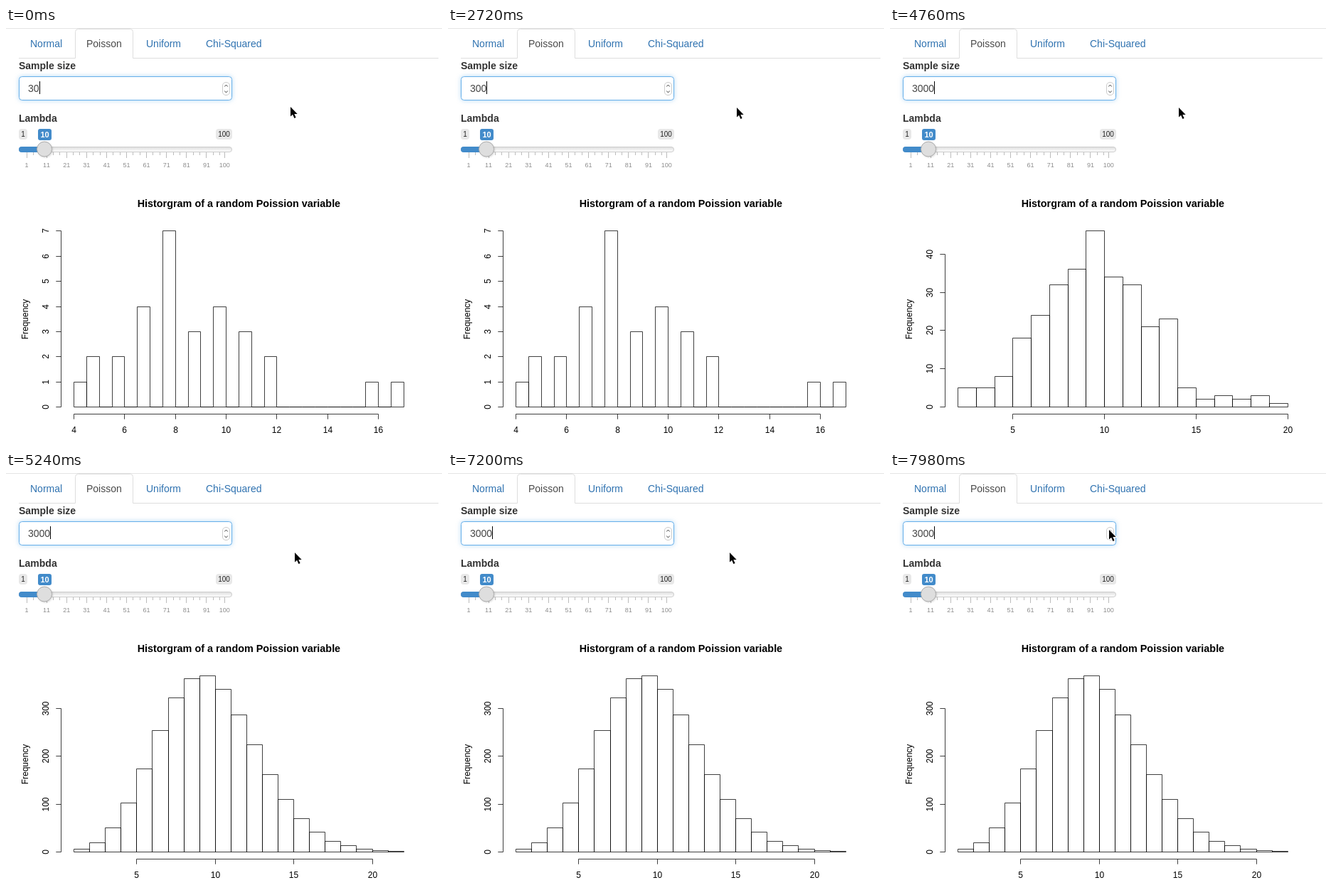
Animation of 613 by 587 pixels, one loop 8 s. Source, as an HTML page:

```html
<!DOCTYPE html>
<html lang="en">
<head>
<meta charset="utf-8">
<title>Poisson histogram</title>
<style>
  html, body { margin: 0; width: 613px; height: 587px; overflow: hidden; background: #fff; }
  svg { display: block; font: 14px "Liberation Sans", Arial, sans-serif; font-kerning: none; }
  .link { fill: #2f72b0; }
  .label { font-weight: bold; fill: #333; }
  .small { font-size: 10px; fill: #222; text-anchor: middle; }
  .grid { font-size: 9px; fill: #8c8c8c; text-anchor: middle; }
  .plot { font-size: 12px; text-anchor: middle; }
  .plot path { fill: none; stroke: #000; stroke-width: .75; }
  .focus { fill: #fff; stroke: #66afe9; filter: drop-shadow(0 0 3px rgba(102, 175, 233, .5)); }
  .knob { fill: #dedede; stroke: #aaa; filter: drop-shadow(1px 1px 1px rgba(0, 0, 0, .15)); }
</style>
</head>
<body>
<svg width="613" height="587" viewBox="0 0 613 587">
  <defs>
    <linearGradient id="groove" x2="0" y2="1">
      <stop stop-color="#dedede"/><stop offset="1" stop-color="#fff"/>
    </linearGradient>
  </defs>

  <!-- Tabs -->
  <path d="M0 .5H613" stroke="#e4e4e4"/>
  <path d="M18 42.5H97.5V5.5a4 4 0 0 1 4-4H174.5a4 4 0 0 1 4 4V42.5H608" fill="none" stroke="#ddd"/>
  <text class="link" x="34" y="27">Normal</text>
  <text x="113" y="27" fill="#4a4a4a">Poisson</text>
  <text class="link" x="197" y="27">Uniform</text>
  <text class="link" x="281" y="27">Chi-Squared</text>

  <!-- Number input -->
  <text class="label" x="18" y="58">Sample size</text>
  <rect class="focus" x="18.5" y="68.5" width="299" height="33" rx="4"/>
  <text id="size" x="31" y="90" fill="#444"></text>
  <path id="caret" d="M.5 75V93" stroke="#000"/>
  <rect x="304.5" y="76.5" width="10" height="18" rx="4.5" fill="#fff" stroke="#ccc"/>
  <path d="M307.3 82.5l2.2-2.5 2.2 2.5M307.3 88.5l2.2 2.5 2.2-2.5" fill="none" stroke="#444"/>

  <!-- Slider -->
  <text class="label" x="18" y="132">Lambda</text>
  <g fill="#e8e8e8">
    <rect x="18" y="142" width="12" height="15" rx="4"/>
    <rect x="295" y="142" width="23" height="15" rx="4"/>
    <rect x="45" y="142" width="19" height="16" rx="3" fill="#428bca"/>
  </g>
  <text class="small" x="24" y="153">1</text>
  <text class="small" x="306.5" y="153">100</text>
  <text class="small" x="54.5" y="154" style="font-size:11px;font-weight:bold;fill:#fff">10</text>
  <rect x="18.5" y="167.5" width="299" height="7" rx="3.5" fill="url(#groove)" stroke="#ccc"/>
  <path d="M54 167H22a4 4 0 0 0 0 8H54z" fill="#428bca"/>
  <g id="scale"></g>
  <circle class="knob" cx="54" cy="170.5" r="10.5"/>

  <!-- Plot -->
  <text x="327.4" y="252" text-anchor="middle" font-size="14.4" font-weight="bold">Historgram of a random Poission variable</text>
  <text class="plot" transform="translate(31 410) rotate(-90)">Frequency</text>
  <g id="plots"></g>

  <path id="cursor" d="M0 0V13.6L3.1 10.7 5.4 16 7.6 15.1 5.3 9.9H9.7z" stroke="#fff" stroke-width="2" paint-order="stroke"/>
</svg>

<script>
const $ = id => document.getElementById(id);
const LOOP = 8000, BLINK = 505;
// Plot frame, with the data inset by 4% of its own span on each side
const FRAME = { left: 77.04, right: 577.76, top: 276.04, bottom: 543.56 };
const snap = v => Math.floor(v) + .5;
const range = (from, to, step) =>
  Array.from({ length: Math.floor((to - from) / step) + 1 }, (_, i) => from + i * step);
const inset = (from, to, k) => from + (to - from) * (.04 + k) / 1.08;

function sliderScale() {
  const xOf = v => 29 + (v - 1) * 2.81;
  let ticks = '', labels = '';
  for (let i = 0; i <= 30; i++) {
    const v = Math.min(1 + i * 10 / 3, 100), big = i % 3 === 0;
    ticks += `M${snap(xOf(v))} 175v${big ? 8 : 4}`;
    if (big) labels += `<text class="grid" x="${xOf(v)}" y="196">${Math.round(v)}</text>`;
  }
  return `<path d="${ticks}" stroke="#bbb"/>${labels}`;
}

// Expected counts of a Poisson variable for values 2, 3, ..., scaled to a peak
function poissonCounts(lambda, bins, peak) {
  const weights = [1];
  for (let k = 3; weights.length < bins; k++) weights.push(weights.at(-1) * lambda / k);
  const max = Math.max(...weights);
  return weights.map(w => Math.round(peak * w / max));
}

function histogram({ start, width, counts, xStep, yStep }) {
  const { left, right, top, bottom } = FRAME;
  const end = start + width * counts.length, max = Math.max(...counts);
  const xOf = v => snap(inset(left, right, (v - start) / (end - start)));
  const yOf = c => snap(inset(bottom, top, c / max));
  const xTicks = range(Math.ceil(start / xStep) * xStep, end, xStep);
  const yTicks = range(0, max, yStep);

  const bars = counts.map((c, i) => {
    const x0 = xOf(start + i * width), x1 = xOf(start + (i + 1) * width);
    return `<path d="M${x0} ${yOf(0)}V${yOf(c)}H${x1}V${yOf(0)}z"/>`;
  }).join('');
  let axes = `M${xOf(xTicks[0])} ${snap(bottom)}H${xOf(xTicks.at(-1))}` +
    `M${snap(left)} ${yOf(0)}V${yOf(yTicks.at(-1))}`;
  let labels = '';
  for (const v of xTicks) {
    axes += `M${xOf(v)} ${snap(bottom)}v7.2`;
    labels += `<text x="${xOf(v)}" y="570">${v}</text>`;
  }
  for (const v of yTicks) {
    axes += `M${snap(left)} ${yOf(v)}h-7.2`;
    labels += `<text transform="translate(59.8 ${yOf(v)}) rotate(-90)">${v}</text>`;
  }
  return `<g class="plot">${bars}<path d="${axes}"/>${labels}</g>`;
}

// The smallest sample has half-wide bins, so every other bin is empty
const halfBins = counts => counts.flatMap((c, i) => i > 1 ? [0, c] : [c]);
const samples = [
  { start: 4, width: .5, xStep: 2, yStep: 1, counts: halfBins([1, 2, 2, 4, 7, 3, 4, 3, 2, 0, 0, 0, 1, 1]) },
  { start: 2, width: 1, xStep: 5, yStep: 10,
    counts: [5, 5, 8, 18, 24, 32, 36, 46, 34, 32, 21, 23, 5, 2, 3, 2, 3, 1] },
  { start: 1, width: 1, xStep: 5, yStep: 100, counts: poissonCounts(10.15, 21, 367) },
];

const typedAt = [-175, 2720, 4760];
const plottedAt = [0, 3130, 5240];
// Pointer [time, x, y]: small jumps, then an eased glide to the spinner
const GLIDE = 7200;
const pointer = [
  [0, 400, 111], [30, 402, 111], [890, 406, 112], [6940, 404, 112],
  [GLIDE, 396, 112], [7750, 309, 75], [7980, 308, 80],
];

const latest = (times, t) => times.findLastIndex(at => t >= at);
const smooth = k => k * k * (3 - 2 * k);

function pointerAt(t) {
  const i = latest(pointer.map(p => p[0]), t);
  const [t0, x0, y0] = pointer[i], next = pointer[i + 1];
  if (t < GLIDE || !next) return [x0, y0];
  const k = smooth((t - t0) / (next[0] - t0));
  return [x0 + (next[1] - x0) * k, y0 + (next[2] - y0) * k];
}

$('scale').innerHTML = sliderScale();
$('plots').innerHTML = samples.map(histogram).join('');
const plots = [...$('plots').children];

function draw() {
  const t = performance.now() % LOOP;
  const typed = latest(typedAt, t), shown = latest(plottedAt, t);
  const hidden = Math.floor((t - typedAt[typed]) / BLINK) % 2;
  $('size').textContent = 30 * 10 ** typed;
  $('caret').setAttribute('transform', `translate(${Math.round(46.6 + 7.7 * typed)})`);
  $('caret').style.visibility = hidden ? 'hidden' : 'visible';
  plots.forEach((plot, i) => plot.style.display = i === shown ? '' : 'none');
  $('cursor').setAttribute('transform', `translate(${pointerAt(t)})`);
  requestAnimationFrame(draw);
}
draw();
</script>
</body>
</html>
```
